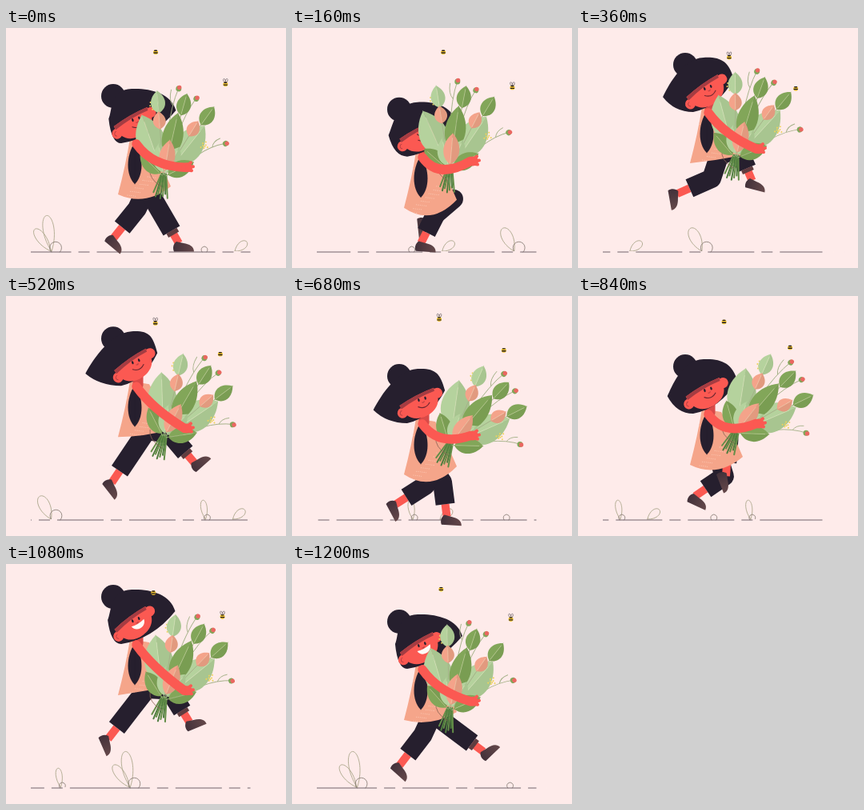
An HTML page with a canvas that plays this animation: 350x300 px, repeating every 1.24 s.

```html
<!DOCTYPE html>
<html lang="en">
<head>
<meta charset="utf-8">
<title>Skipping with flowers</title>
<style>
html, body { margin: 0; width: 100%; height: 100%; overflow: hidden; background: #feebea; }
canvas { display: block; width: 350px; height: 300px; }
</style>
</head>
<body>
<canvas id="stage" width="350" height="300"></canvas>
<script>
const c = document.getElementById('stage').getContext('2d');
const LOOP = 1240, STEP = 40, HOP = LOOP / 2, SPEED = 0.6145, BELT = LOOP * SPEED;
const DARK = '#261f2e', SKIN = '#fb5952', VEST = '#f5a58a', BROWN = '#65484a';
const PALE = '#b5d29d', GREEN = '#82a659', PINK = '#f4a38a', LINE = '#a9a488';

// Key points of one foot: time, x, y, shoe turn. The other foot is one hop later.
const steps = [
  [0, 222, 274, 0], [160, 167, 274, 4], [360, 120, 214, 80], [520, 132, 241, 52],
  [620, 136, 270, 40], [680, 128, 268, 62], [780, 163, 250, 84], [970, 220, 198, 18],
  [1140, 243, 208, -42], [1200, 247, 234, -44]
];
// Fans of leaves: colours, inner and outer radius, half width, spread, turn.
const fans = [
  [[PALE, GREEN, GREEN], 80, 108, 9, 20, 6],
  [[PALE, PALE], 20, 82, 18, 29, 0],
  [[GREEN], 25, 82, 13, 0, 3],
  [[PINK, PINK], 60, 82, 8, 18, 4],
  [[GREEN, PALE, PALE, GREEN], 6, 42, 10, 54, 0],
  [[PINK], 8, 47, 10, 0, 0]
];

const mod = (a, n) => ((a % n) + n) % n;
const mix = (a, b, k) => a + (b - a) * k;
const rad = d => d * Math.PI / 180;
const wave = (t, peak, period = LOOP) => Math.cos((t - peak) / period * Math.PI * 2);

// Smooth periodic curve through the key points.
function glide(rows, time) {
  const t = mod(time, LOOP), n = rows.length;
  let i = n - 1;
  while (rows[i][0] > t) i--;
  const at = j => rows[mod(j, n)];
  const when = j => at(j)[0] + Math.floor(j / n) * LOOP;
  const h = when(i + 1) - when(i), u = (t - when(i)) / h;
  return at(i).slice(1).map((p, k) => {
    const q = at(i + 1)[k + 1];
    const m = (q - at(i - 1)[k + 1]) / (when(i + 1) - when(i - 1)) * h;
    const o = (at(i + 2)[k + 1] - p) / (when(i + 2) - when(i)) * h;
    const a = 2 * (p - q) + m + o, b = 3 * (q - p) - 2 * m - o;
    return ((a * u + b) * u + m) * u + p;
  });
}

function shape(fill, draw) {
  c.beginPath();
  draw();
  c.fillStyle = fill;
  c.fill();
}
function stroke(color, width, draw, cap = 'round') {
  c.beginPath();
  draw();
  c.strokeStyle = color;
  c.lineWidth = width;
  c.lineCap = cap;
  c.lineJoin = 'round';
  c.stroke();
}
function oval(fill, x, y, rx, ry = rx) {
  shape(fill, () => c.ellipse(x, y, rx, ry, 0, 0, 7));
}
function line(x, y, x2, y2) {
  c.moveTo(x, y);
  c.lineTo(x2, y2);
}
function local(x, y, turn, draw) {
  c.save();
  c.translate(x, y);
  c.rotate(rad(turn));
  draw();
  c.restore();
}

// A leaf growing upwards from the local origin.
function leaf(color, len, w, veined = true) {
  const half = s => {
    c.moveTo(0, 0);
    c.bezierCurveTo(w * 1.33 * s, -len * 0.2, w * 1.33 * s, -len * 0.68, 0, -len);
  };
  for (const s of [-1, 1]) shape(color, () => half(s));
  stroke(color, 0.6, () => line(0, 0, 0, -len));
  if (!veined) return;
  shape('rgba(40,70,20,.09)', () => half(1));
  stroke('rgba(255,250,220,.45)', 0.7, () => line(0, -2, 0, -len * 0.85));
}

function sprout(x, len, w, turn) {
  local(x, 279, turn, () => stroke(LINE, 0.8, () => {
    c.moveTo(0, 0);
    c.bezierCurveTo(-w * 1.6, -len * 0.5, -w, -len, 0, -len);
    c.bezierCurveTo(w, -len, w * 1.6, -len * 0.5, 0, 0);
  }));
}
function bump(x, r) {
  stroke('#81776f', 0.8, () => c.arc(x, 280 - r * 0.7, r, Math.PI * 0.75, Math.PI * 2.25));
}

function ground(t) {
  const place = x => mod(x - t * SPEED + 60, BELT) - 60;
  const grow = (spots, draw) => spots.map(place).filter(x => x > 42 && x < 304).forEach(draw);
  grow([822], x => {
    sprout(x - 3, 45, 7, -8);
    sprout(x - 4, 34, 6, -36);
    bump(x + 2, 7.5);
  });
  grow([379], x => {
    sprout(x - 3, 32, 7, -26);
    bump(x + 3, 7.5);
  });
  grow([295, 612], x => sprout(x - 9, 19, 5, 52));
  grow([569, 732], x => {
    sprout(x, 24, 4, -8);
    bump(x + 2, 4);
  });
  grow([248, 686], x => bump(x, 4));

  stroke('#70656c', 1, () => line(31, 280, 305.5, 280), 'butt');
  for (let i = 0; i < 8; i++) {
    for (const x of [86, 109]) {
      shape('#feebea', () => c.rect(place(x + i * 90) - 4.5, 279, 9, 2));
    }
  }
}

function bee(x, y, winged) {
  if (winged) {
    for (const s of [-1, 1]) {
      stroke('#6d656a', 0.7, () => c.ellipse(x + s * 1.3, y - 4.6, 1.3, 2.4, s * 0.4, 0, 7));
    }
  }
  oval('#f3c52e', x, y, 3, 2.8);
  stroke('#211b22', 1.4, () => {
    line(x - 1.3, y - 2, x + 1.3, y - 2);
    line(x - 2, y + 0.8, x + 2, y + 0.8);
  });
}

function leg(time, hx, hy) {
  const [x, y, turn] = glide(steps, time), a = rad(turn);
  const ax = x - 6 * Math.cos(a) + 5 * Math.sin(a), ay = y - 6 * Math.sin(a) - 5 * Math.cos(a);
  // The knee bends forward, more so when the foot is lifted.
  const THIGH = 30, SHIN = 48;
  const d = Math.hypot(ax - hx, ay - hy), ux = (ax - hx) / d, uy = (ay - hy) / d;
  const along = Math.min(THIGH, (d * d + THIGH ** 2 - SHIN ** 2) / (2 * d));
  const lift = Math.max(0, Math.min(1, (274 - y) / 24));
  const bend = Math.sqrt(THIGH ** 2 - along ** 2) * mix(0.3, 0.85, lift);
  const kx = hx + ux * along + uy * bend, ky = hy + uy * along - ux * bend;
  const ex = mix(kx, ax, 0.64), ey = mix(ky, ay, 0.64);

  stroke(SKIN, 10, () => line(ex, ey, ax, ay), 'butt');
  if (ax > ex + 3) {
    stroke('#603d40', 15, () => line(ex, ey, mix(ex, ax, 0.3), mix(ey, ay, 0.3)), 'butt');
  }
  local(x, y, turn, () => {
    const g = c.createLinearGradient(-13, 0, 13, 0);
    g.addColorStop(0, '#42313a');
    g.addColorStop(1, BROWN);
    shape(g, () => {
      c.moveTo(-12, 5.5);
      c.lineTo(13, 5.5);
      c.bezierCurveTo(13, -1, 7, -4, 0, -5);
      c.lineTo(-9, -7);
      c.bezierCurveTo(-13, -4, -14, 1, -12, 5.5);
    });
  });
  stroke(DARK, 24, () => {
    c.moveTo(hx, hy);
    c.lineTo(kx, ky);
    c.lineTo(ex, ey);
  }, 'butt');
}

// Drawn from the neck down.
function vest(bob) {
  const low = 72 + 8 * bob;
  const outline = () => {
    c.moveTo(-7, 0);
    c.quadraticCurveTo(-12, 32, -22, 70);
    c.quadraticCurveTo(12, 2 * low - 65, 44, 60);
    c.quadraticCurveTo(30, 27, 17, 4);
    c.closePath();
  };
  shape(VEST, outline);
  c.save();
  c.beginPath();
  outline();
  c.clip();
  for (let i = 0; i < 70; i++) {
    oval('rgba(255,222,204,.65)', mod(i * 40.8, 66) - 22, 20 + mod(i * 23.1, 60), 0.55);
  }
  c.restore();
  local(-1, 57, 180, () => local(0, 52, 180, () => local(0, 52, 0, () => leaf(DARK, 52, 8.5, false))));
}

// Drawn around the middle of the face.
function face(t, bob) {
  const swing = wave(t, 560), tilt = -32 + 5 * bob;
  const left = -45 - 15 * swing, right = 42 - 12 * swing, tip = 4 + 8 * swing;
  stroke('#d94a48', 13, () => line(6, 14, 6, 26));
  oval(DARK, -25, -32, 15);
  shape(DARK, () => {
    c.moveTo(left, tip);
    c.bezierCurveTo(left + 5, tip - 10, -30, -40, -2, -41);
    c.bezierCurveTo(20, -42, right - 6, -36, right, -14);
    c.quadraticCurveTo(right / 2 - 2, 21, -15, 27);
    c.quadraticCurveTo(left / 2 - 12, 27, left, tip);
  });
  local(0, 0, tilt, () => {
    oval(SKIN, -25, 3, 6.5);
    oval(SKIN, 25, 1, 6.5);
    stroke('#b73f43', 0.9, () => c.arc(-25, 3, 3, 2.2, 4.8));
    const bangs = y => c.quadraticCurveTo(0, y - 3, 24, y);
    shape(SKIN, () => {
      c.moveTo(-24, -7);
      bangs(-7);
      c.bezierCurveTo(27, 12, 14, 20, 1, 20);
      c.bezierCurveTo(-15, 20, -25, 11, -24, -7);
    });
    shape('#a53c42', () => {
      c.moveTo(-24, -7);
      bangs(-7);
      c.lineTo(23, -3);
      c.quadraticCurveTo(0, -6, -24, -2);
    });
  });
  local(0, 0, tilt * 0.6, () => {
    for (const x of [0, 8.5]) {
      if (t >= 120 && t <= 240) stroke(DARK, 1, () => c.arc(x, -2, 2.2, 0.2, 2.9));
      else oval(DARK, x, -2, 1.2, 2.1);
    }
    stroke('#b73f43', 1, () => c.arc(4.5, 1, 1.6, 0.2, 2.4));
    if (t >= 880) {
      shape('#fffaf6', () => {
        c.moveTo(-4, 4);
        c.quadraticCurveTo(5, 5, 14, 1);
        c.bezierCurveTo(14, 11, -1, 14, -4, 4);
      });
    } else {
      stroke('#6c2730', 1.1, () => {
        c.moveTo(-3, 6);
        c.quadraticCurveTo(5, 12, 12, 5);
      });
    }
  });
}

function pollen(turn, r) {
  local(0, 0, turn, () => {
    for (let i = 0; i < 8; i++) {
      oval('#eed35a', Math.cos(i * 2.4) * (1 + i * 0.7), Math.sin(i * 2.4) * (1 + i * 0.6) - r, 1);
    }
  });
}

// Drawn around the knot of the stems.
function bouquet(lean) {
  local(0, 0, lean * 0.5, () => {
    for (let i = 0; i < 7; i++) {
      stroke(i % 2 ? '#4f7d3f' : '#648e48', 2, () => line(i - 3, -4, i * 3 - 11, 20 + (i * 5) % 8));
    }
  });
  stroke('#8a6253', 0.8, () => {
    c.moveTo(-17, -10);
    c.quadraticCurveTo(-19, 2, -3, 12);
  });
  local(0, 0, lean, () => {
    for (let i = 0; i < 3; i++) {
      local(0, 0, i * i * 13, () => {
        const r = 113 - i * i * 6;
        stroke('#a4b188', 0.9, () => {
          c.moveTo(-4, -50);
          c.quadraticCurveTo(-6, -r * 0.8, 0, -r);
          c.moveTo(-4, -r * 0.8);
          c.quadraticCurveTo(-10, -r * 0.85, -9, 4 - r);
        });
        oval(GREEN, 0, 1 - r, 3.5);
        oval('#ea6761', 0.6, -0.6 - r, 2.7);
      });
    }
    pollen(-18, 90);
    for (const [colors, from, to, w, spread, turn] of fans) {
      colors.forEach((color, i) => {
        const side = colors.length > 1 ? 2 * i / (colors.length - 1) - 1 : 0;
        local(0, 0, turn + side * spread, () => {
          stroke('#a4b188', 0.9, () => line(0, -from / 2, 0, -from));
          local(0, -from, 0, () => leaf(color, to - from, w));
        });
      });
    }
    pollen(43, 64);
  });
}

function arm(sx, sy, hx, hy) {
  stroke(SKIN, 11.5, () => {
    c.moveTo(sx, sy);
    c.quadraticCurveTo(sx + 20, sy + 28, hx - 5, hy);
  });
  oval(SKIN, hx - 2, hy, 7, 6);
  stroke(SKIN, 4, () => {
    line(hx - 2, hy - 2, hx + 3, hy - 6);
    line(hx, hy, hx + 6, hy - 1);
    line(hx - 2, hy + 3, hx + 4, hy + 4);
  });
}

function draw(t) {
  c.fillStyle = '#feebea';
  c.fillRect(0, 0, 350, 300);
  ground(t);

  // The body bobs once per hop; the flowers follow and sway once per loop.
  const bob = wave(t, 115, HOP), nx = 162, ny = 125 + 33 * bob;
  const kx = 197, ky = 175 + 12 * wave(t, 35, HOP);
  const lean = 22 + 17 * wave(t, 770);
  leg(t + HOP, nx + 14, ny + 62);
  leg(t, nx + 14, ny + 62);
  local(nx, ny, 0, () => vest(bob));
  local(nx - 3, ny - 21, 0, () => face(t, bob));
  local(kx, ky, 0, () => bouquet(lean));
  arm(nx + 1, ny + 7, kx + 31, ky - 12);

  bee(186 + 3.5 * wave(t, 250), 33 - 4 * wave(t, 80, HOP), t > 300 && t < 800);
  bee(270 + 5.5 * wave(t, 130), 70 + 6 * wave(t, 300), t > 880 || t < 260);
}

function tick(now) {
  draw(Math.floor(mod(now, LOOP) / STEP) * STEP);
  requestAnimationFrame(tick);
}
requestAnimationFrame(tick);
</script>
</body>
</html>
```
